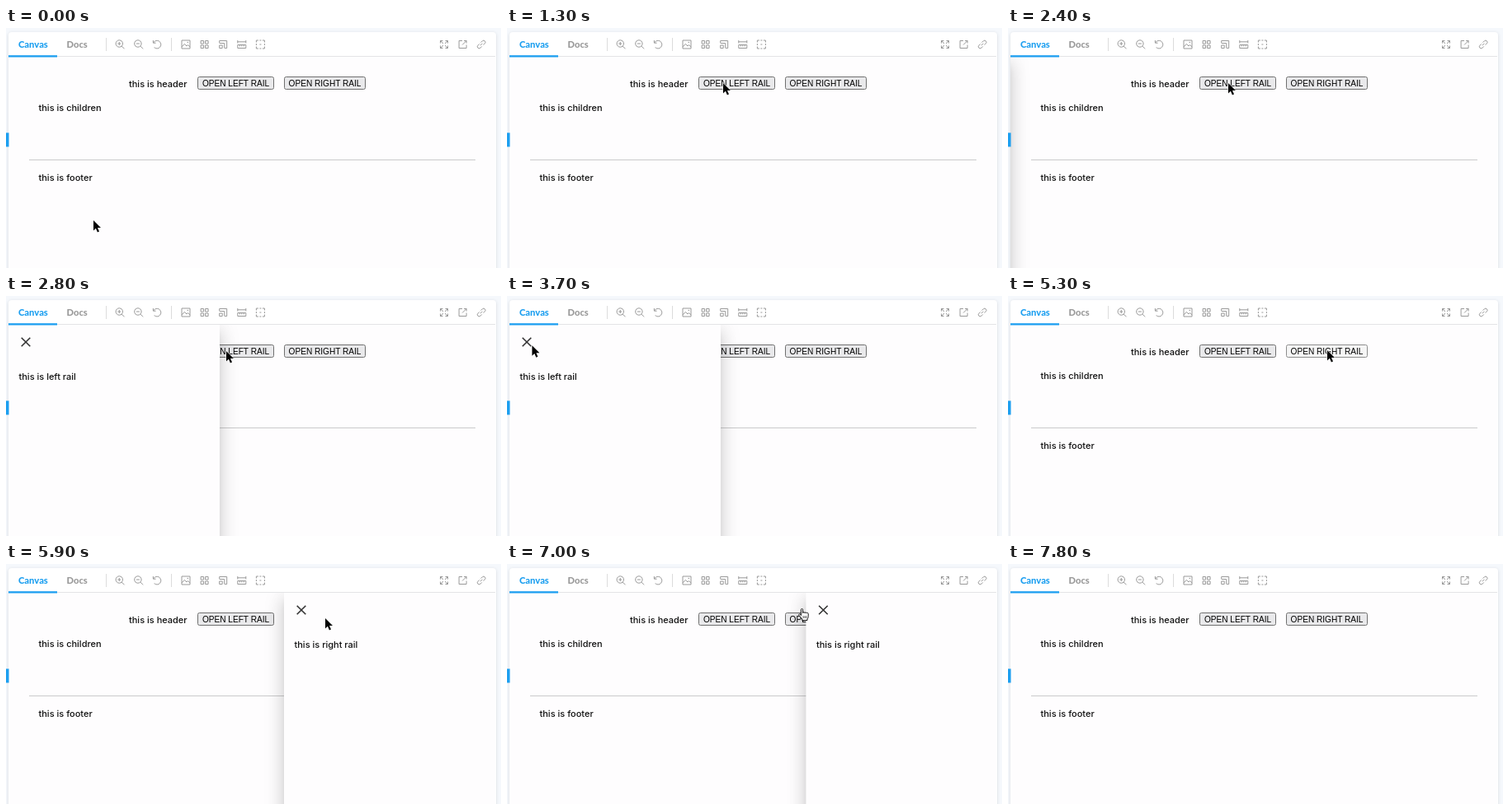
Animation of 600x292 px, one loop 8 s. Source, as an HTML page:

```html
<!DOCTYPE html>
<html lang="en">
<head>
<meta charset="utf-8">
<title>Left and right rails</title>
<style>
  html, body { margin: 0; width: 100%; height: 100%; overflow: hidden; }
  body { position: relative; background: #f5f8fc; }
  #stage { position: absolute; left: 0; top: 0; width: 600px; height: 292px; overflow: hidden; }
  #stage svg { position: absolute; left: 0; top: 0; overflow: visible; }
  .panel {
    position: absolute; left: 3px; top: 5px; width: 591px; height: 320px;
    background: #fff; border-radius: 4px; box-shadow: 0 1px 4px rgba(0, 0, 0, .12);
  }
  .preview {
    position: absolute; left: 3px; top: 35px; width: 590px; height: 257px;
    overflow: hidden; background: #fefdfe;
  }
  .preview p {
    position: absolute; margin: 0; white-space: pre; color: #111;
    font: 500 11px/16px Inter, sans-serif;
  }
  .preview hr {
    position: absolute; left: 25px; top: 125px; width: 541px; height: 1px;
    margin: 0; border: 0; background: #cacacb;
  }
  .button {
    position: absolute; top: 24px; height: 16px; box-sizing: border-box;
    border: 1px solid #6f6f6f; border-radius: 2.5px; background: #e9e9eb; color: #000;
    font: 10.1px/15px "Liberation Sans", Arial, sans-serif; text-align: center; white-space: pre;
  }
  .button.pressed { background: #f5f5f5; border-color: #8d8d8d; }
  .rail {
    position: absolute; top: 0; width: 256px; height: 300px; background: #fefdfe;
    box-shadow: 0 6px 8px -4px rgba(0, 0, 0, .14), 0 12px 18px 2px rgba(0, 0, 0, .1),
      0 5px 23px 4px rgba(0, 0, 0, .08);
  }
  .rail p { left: 12.5px; top: 55px; }
  .tab { font: 800 11.2px Lato, sans-serif; }
</style>
</head>
<body>
<div id="stage">
  <div class="panel"></div>

  <div class="preview">
    <p style="left:146px; top:25px">this is header</p>
    <p style="left:36.5px; top:54px">this is children</p>
    <p style="left:36.5px; top:139px">this is footer</p>
    <hr>
    <div class="button" id="openLeft" style="left:229px; width:93px">OPEN LEFT RAIL</div>
    <div class="button" id="openRight" style="left:334px; width:99px">OPEN RIGHT RAIL</div>
    <div class="rail" id="left" style="left:0"></div>
    <div class="rail" id="right" style="right:0"></div>
  </div>

  <svg width="600" height="292" fill="none" stroke="#999">
    <path d="M3 34.5H593" stroke="#e3e4e6"/>
    <path d="M121.5 12V28M200.5 12V28" stroke="#dcdcdc"/>
    <g stroke="none" fill="#1c9ff0">
      <rect x="3" y="33.2" width="59" height="2.3"/>
      <rect y="127.5" width="3.5" height="17"/>
      <text class="tab" x="15" y="24">Canvas</text>
      <text class="tab" x="73.5" y="24" fill="#999">Docs</text>
    </g>
    <g id="icons"></g>
  </svg>

  <svg id="cursor" width="16" height="16">
    <path id="arrow" d="M0 0V12.4L2.9 9.8 4.9 14.4 7 13.5 5 9.1H9Z"
      stroke="#fff" stroke-width="1.2" stroke-linejoin="round" paint-order="stroke"/>
    <g id="hand" transform="translate(-4.2 0)" stroke="#111" stroke-linejoin="round">
      <path fill="#fff" d="M3.6 8.6V1.7q0-1.2 1.1-1.2t1.1 1.2V5.6q.2-1 1.2-1t1.2 1q.3-.8 1.2-.7t1.1 1q.3-.6 1-.5t.9 1.1V9.5q0 2-1.2 3.4V14.5H5V13L1.2 8.6q-.7-1.1.1-1.6t1.5.3Z"/>
      <path stroke-width=".7" d="M6.300 9.200V12M8.200 9.200V12M10 9.200V12"/>
    </g>
  </svg>
</div>

<script>
const LOOP = 8000, TICK = 100, RAIL = 256;
const $ = id => document.getElementById(id);

// Toolbar icons, each drawn around its own centre.
const line = d => `<path d="${d}"/>`;
const box = (x, y, w, h = w) => line(`M${x} ${y}h${w}v${h}h${-w}Z`);
const spin = (shape, n) => Array.from({ length: n }, (_, i) =>
  `<g transform="rotate(${i * 360 / n})">${shape}</g>`).join('');
const lens = '<circle cx="-.7" cy="-1" r="4.2"/>' + line('M2.3 2.1L5.5 5.3M-2.7-1H1.3');

const row = (left, shapes) => shapes.map((shape, i) =>
  `<g transform="translate(${left + 22.6 * i} 20)">${shape}</g>`).join('');

$('icons').innerHTML =
  row(138, [
    lens + line('M-.7-3V1'),
    lens,
    line('M-4.8-5V-1.800H-1.600M-4.500-2A4.800 4.800 0 1 1-3.500 3.600')
  ]) +
  row(218, [
    box(-5, -5, 10) + line('M-5 3L-1.7-.6 1 2 2.6.6 5 3M1.5-2.6h1.6'),
    spin(box(-4.5, -4.5, 3.5), 4),
    line('M-4.5-2V-4.500H4.500V4.500H2M-4.500-1.500H1.500V4.500') + box(-4.5, 1, 3.5),
    box(-5, .5, 10, 4) + line('M-5-5v3.5M5-5v3.5M-5-3.2H5M-2.5.5v2M0 .5v2M2.5.5v2'),
    spin(line('M-5-2.500V-5H-2.500M-1-5H1'), 4) + line('M-1 0H1')
  ]) +
  row(531, [
    spin(line('M-4.500-1.500V-4.500H-1.500M-4.500-4.500L-1-1'), 4),
    line('M-.5-4.500H-4.500V4.500H4.500V.5M1.500-4.500H4.500V-1.500M4.500-4.500L-.5.5'),
    spin(line('M-1.300 1.300L0 0M-.6-2.400L1.200-4.200a2.100 2.100 0 0 1 3 3L2.400.6'), 2)
  ]);

for (const side of ['left', 'right']) {
  $(side).innerHTML =
    `<svg stroke="#333" stroke-width="1.6">${line('M15.7 15.7l10.600 10.600m0-10.600l-10.600 10.600')}</svg>
     <p>this is ${side} rail</p>`;
}

const within = (t, from, to) => t >= from && t < to;
const part = (t, from, to) => Math.min(1, Math.max(0, (t - from) / (to - from)));
const smooth = u => u * u * (3 - 2 * u);
const easeOut = u => 1 - (1 - u) ** 3;

// The rail waits off stage for a moment, so its shadow shows before it slides in.
function drawRail(id, sign, t, mount, close) {
  const shown = easeOut(part(t, mount + 175, mount + 400)) - smooth(part(t, close, close + 195));
  $(id).style.visibility = within(t, mount, close + 200) ? 'visible' : 'hidden';
  $(id).style.transform = `translateX(${sign * RAIL * (1 - shown)}px)`;
}

// Pointer moves: from, to, x, y
const moves = [
  [400, 1300, 262, 67],
  [1600, 1800, 267, 67],
  [2900, 3800, 22, 60],
  [4000, 4400, 27, 54],
  [4600, 5300, 387, 66],
  [6200, 6400, 348, 52],
  [6600, 6800, 357, 54],
  [7000, 7300, 209, 292]
];

function drawCursor(t) {
  let [x, y] = t < 100 ? [106, 234] : [5, 0];
  for (const [from, to, toX, toY] of moves) {
    const u = smooth(part(t, from, to));
    x += (toX - x) * u;
    y += (toY - y) * u;
  }
  const away = within(t, 100, 500) || t >= 7300;
  const overClose = within(t, 4100, 4700) || within(t, 6400, 7100);
  $('cursor').style.transform = `translate(${x}px, ${y}px)`;
  $('arrow').style.opacity = away || overClose ? 0 : 1;
  $('hand').style.opacity = overClose ? 1 : 0;
}

const start = performance.now();
function draw() {
  const t = Math.floor((performance.now() - start) % LOOP / TICK) * TICK;
  drawRail('left', -1, t, 2400, 4562);
  drawRail('right', 1, t, 5500, 6962);
  $('openLeft').classList.toggle('pressed', within(t, 2200, 2400));
  $('openRight').classList.toggle('pressed', within(t, 5300, 5500));
  drawCursor(t);
  requestAnimationFrame(draw);
}
draw();
</script>
</body>
</html>
```
